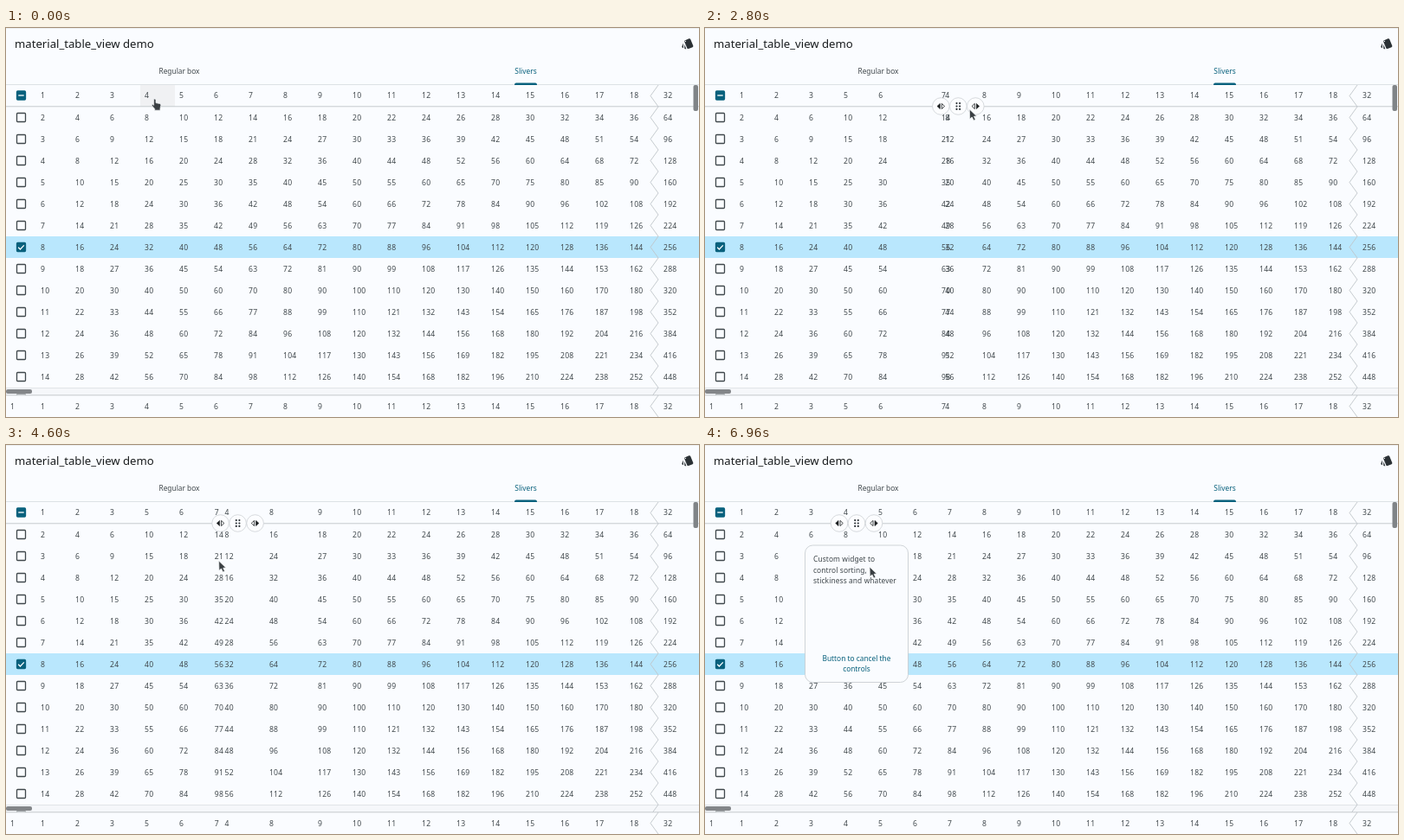
Write an HTML page that moves like this. It is 800 px wide and 450 px high and loops after 7 s.

```html
<!DOCTYPE html>
<html lang="en">
<head>
<meta charset="utf-8">
<title>Table view demo</title>
<style>
  html, body { margin: 0; width: 100%; height: 100%; overflow: hidden; background: #fafcff; }
  svg { display: block; width: 100vw; height: 100vh; }
  text { font-family: "Noto Sans", "Open Sans", sans-serif; fill: #40484c; white-space: pre; }
  .cell { font-size: 8.6px; letter-spacing: .25px; }
  .note { font-size: 8.4px; letter-spacing: .1px; }
  .tab { font-size: 8.35px; font-weight: 500; text-anchor: middle; }
  .teal { fill: #09617d; }
</style>
</head>
<body>
<svg id="stage" viewBox="0 0 800 450"></svg>
<script>
const LOOP = 7000, COL = 40, ROW = 25, HOME = 155;
const PICK = 2050, DROP = 5700, SHIFT = 200;
const BG = '#fafcff', INK = '#40484c', TEAL = '#09617d', LINE = '#c5cacd';
const stage = document.getElementById('stage');

function add(parent, tag, attrs, content) {
  const node = document.createElementNS('http://www.w3.org/2000/svg', tag);
  for (const key in attrs) node.setAttribute(key, attrs[key]);
  if (content !== undefined) node.textContent = content;
  parent.appendChild(node);
  return node;
}
const rect = (parent, x, y, width, height, fill, more) =>
  add(parent, 'rect', { x, y, width, height, fill, ...more });
const label = (parent, x, y, cls, content) =>
  add(parent, 'text', { x, y, class: cls }, content);
const group = parent => add(parent, 'g', {});
const path = (parent, d, more) => add(parent, 'path', { d, ...more });

const slot = n => 35 + COL * (n - 1);
const rowMid = r => r === 1 ? 78 : 53.5 + ROW * r;

// Backgrounds
rect(stage, 0, 0, 800, 450, BG);
rect(stage, 0, 0, 800, 1, '#eceef0');
const hover = rect(stage, HOME, 66, COL, 25, '#f0f1f3');
rect(stage, 0, 241, 800, ROW, '#b9e7fd');
rect(stage, 0, 65, 800, 1, '#dde2e5');
rect(stage, 0, 90.3, 800, 1, LINE);

// App bar and tabs
add(stage, 'text', { x: 10, y: 23, 'font-size': '13.15px', style: 'fill:#191c1e' }, 'material_table_view demo');
path(stage, 'M2.5 19.6l1.4.6v-9l-2.5 5.8c-.4 1 .1 2.2 1.1 2.6zM22 16L17.1 4c-.4-.9-1.5-1.5-2.6-1.1L7.1 6' +
  'c-1 .4-1.5 1.5-1.1 2.6l5 12c.4 1 1.6 1.5 2.6 1l7.3-3c1-.4 1.5-1.6 1.1-2.6zM7.9 8.8a1 1 0 1 1 0-2 1 1 0 0 1 0 2z' +
  'm-2 11c0 1.1.9 2 2 2h1.4l-3.4-8.4z',
  { transform: 'translate(779.5 10.5) scale(.625)', fill: '#2b3135' });
label(stage, 200, 53, 'tab', 'Regular box');
label(stage, 600, 53, 'tab teal', 'Slivers');
path(stage, 'M587 66v-.5q0-2 2-2h22q2 0 2 2v.5z', { fill: TEAL });

// Checkboxes
for (let r = 1; r <= 15; r++) {
  const y = rowMid(r), on = r === 1 || r === 8;
  rect(stage, 12.5, y - 5, 10, 10, on ? TEAL : 'none',
    { rx: 1, stroke: on ? TEAL : INK, 'stroke-width': 1.3 });
  if (on) path(stage, r === 1 ? `M14.3 ${y}h6.4` : `M14.2 ${y + .3}l2.2 2.2 4.4-4.6`,
    { stroke: '#fff', 'stroke-width': 1.3, fill: 'none' });
}

// Strip below the rows, footer
rect(stage, 0, 416, 800, 9, '#f2f4f6', { opacity: .55 });
rect(stage, 0, 416, 800, .8, '#dde1e4');
rect(stage, 0, 425, 800, 25, BG);
rect(stage, 0, 424.3, 800, 1, LINE);
rect(stage, 0, 418, 30, 5, '#838689', { rx: 2 });
label(stage, 5, 440.6, 'cell', '1');

// Columns
function column(n, x) {
  const g = group(stage);
  for (let r = 1; r <= 14; r++) label(g, x + 5, rowMid(r) + 3.1, 'cell', n * r);
  label(g, x + 5, 440.6, 'cell', n);
  return g;
}
const columns = {};
for (let n = 1; n <= 18; n++) columns[n] = column(n, slot(n));
column(32, 754);
stage.appendChild(columns[4]);

// Wiggly divider
function wiggle(top, rows) {
  let d = `M753 ${top}`;
  for (let i = 0; i < rows; i++) d += 'l-9 12.5 9 12.5';
  path(stage, d, { fill: 'none', stroke: '#c0c6ca', 'stroke-width': .9 });
}
wiggle(66, 14);
path(stage, 'M753 416l-6.3 8.7', { fill: 'none', stroke: '#c0c6ca', 'stroke-width': .9 });
wiggle(425, 1);
rect(stage, 793.5, 66, 5.5, 30, '#808487', { rx: 2 });

// Column controls
const controls = group(stage);
const popup = group(controls);
rect(popup, 115.5, 116, 119, 158.5, BG, { rx: 9, stroke: '#c4c9cd', 'stroke-width': .8 });
['Custom widget to', 'control sorting,', 'stickiness and whatever'].forEach((s, i) =>
  label(popup, 125, 135 + 12.5 * i, 'note', s));
['Button to cancel the', 'controls'].forEach((s, i) =>
  label(popup, 175, 249.5 + 12.5 * i, 'tab teal', s));

const disks = [155, 175, 195].map(cx =>
  add(controls, 'circle', { cx, cy: 90.5, r: 9.8, fill: '#fcfdff', stroke: '#cdd1d5', 'stroke-width': .8 }));
function arrows(cx, solid) {
  for (const side of [-1, 1]) path(controls, `M${cx + side} 87.4l${side * 3.3} 3.1l${-side * 3.3} 3.1z`, {
    fill: side === solid ? '#191c1e' : 'none', stroke: '#191c1e',
    'stroke-width': side === solid ? .6 : .8
  });
}
arrows(155, -1);
arrows(195, 1);
for (let i = 0; i < 6; i++)
  add(controls, 'circle', { cx: 173.2 + 3.6 * (i % 2), cy: 87.1 + 3.4 * (i >> 1), r: 1.1, fill: '#2b3135' });

// Pointers, both with the tip at 0,0
const outline = { fill: '#3a3f43', stroke: '#f4f6f8', 'stroke-width': .7, 'stroke-linejoin': 'round' };
const arrow = path(stage, 'M0 0L.4 11.2 2.9 9 4.9 13 6.9 12 5.1 8.3 8.2 7.9z', outline);
const hand = path(stage, 'M-1.4 .8q1.2-1.6 2.4 0V4.6l4.6 1q1.3.4 1.2 1.8L6 11v2.2H-.4V11.4L-3.6 7.8q-.4-1.6 1.2-1.2l1 .8z', outline);

// Motion: time, left edge, speed in px/ms
const DRAG = [
  [2200, 155, 0], [2800, 272, .32], [3480, 431, .1], [3640, 440, 0],
  [3900, 440, 0], [4600, 248, -.41], [5127, 177, -.015], [5320, 174, 0]
];
// Time, lead of the pointer over the handle, tip height
const LEAD = [
  [2050, -3, 82], [2800, 13, 94], [3480, -1, 97], [3640, -2, 98],
  [3900, -3, 102], [4600, -22, 134], [5127, -4, 141], [5320, -4, 141]
];
const clamp = p => Math.min(1, Math.max(0, p));
const smooth = p => { p = clamp(p); return p * p * (3 - 2 * p); };
const ramp = (t, start, span) => smooth((t - start) / span);

function span(keys, t) {
  let i = 0;
  while (i < keys.length - 2 && t >= keys[i + 1][0]) i++;
  const a = keys[i], b = keys[i + 1];
  return { a, b, p: clamp((t - a[0]) / (b[0] - a[0])) };
}
function dragLeft(t) {
  const { a, b, p } = span(DRAG, t), dt = b[0] - a[0], s = smooth(p), q = 1 - p;
  return a[1] + (b[1] - a[1]) * s + dt * (a[2] * p * q * q - b[2] * p * p * q);
}
function lead(t, k) {
  const { a, b, p } = span(LEAD, t);
  return a[k] + (b[k] - a[k]) * smooth(p);
}

// When the dragged edge passes the middle of each neighbour, out and back
const passes = [];
for (let n = 5; n <= 18; n++) {
  const limit = slot(n) - 20;
  let out = 0, back = 0;
  for (let t = 2200; t < 5400; t += 4) {
    const over = dragLeft(t) > limit;
    if (over && !out) out = t;
    if (out && !over && !back) back = t;
  }
  if (out) passes.push({ n, out, back });
}

const move = (node, x, y = 0) => node.setAttribute('transform', `translate(${x.toFixed(2)} ${y.toFixed(2)})`);
const show = (node, on) => node.setAttribute('opacity', Number(on).toFixed(3));

function draw(t) {
  const held = dragLeft(t);
  const left = held + (HOME - held) * ramp(t, DROP, SHIFT);
  move(columns[4], left - HOME);
  move(controls, left - HOME);
  for (const { n, out, back } of passes)
    move(columns[n], COL * (ramp(t, back, SHIFT) - ramp(t, out, SHIFT)));

  show(controls, ramp(t, 600, 250));
  show(popup, 1 - ramp(t, PICK, 150) + ramp(t, DROP, 200));
  show(hover, t < PICK);
  disks[1].setAttribute('fill', t < PICK ? '#ececef' : '#fcfdff');

  const x = held + 20 + lead(t, 1), y = lead(t, 2);
  move(arrow, x, y);
  move(hand, x, y);
  show(hand, t < 600);
  show(arrow, t >= 600);
}

const begin = performance.now();
function tick() {
  draw((performance.now() - begin) % LOOP);
  requestAnimationFrame(tick);
}
tick();
</script>
</body>
</html>
```
